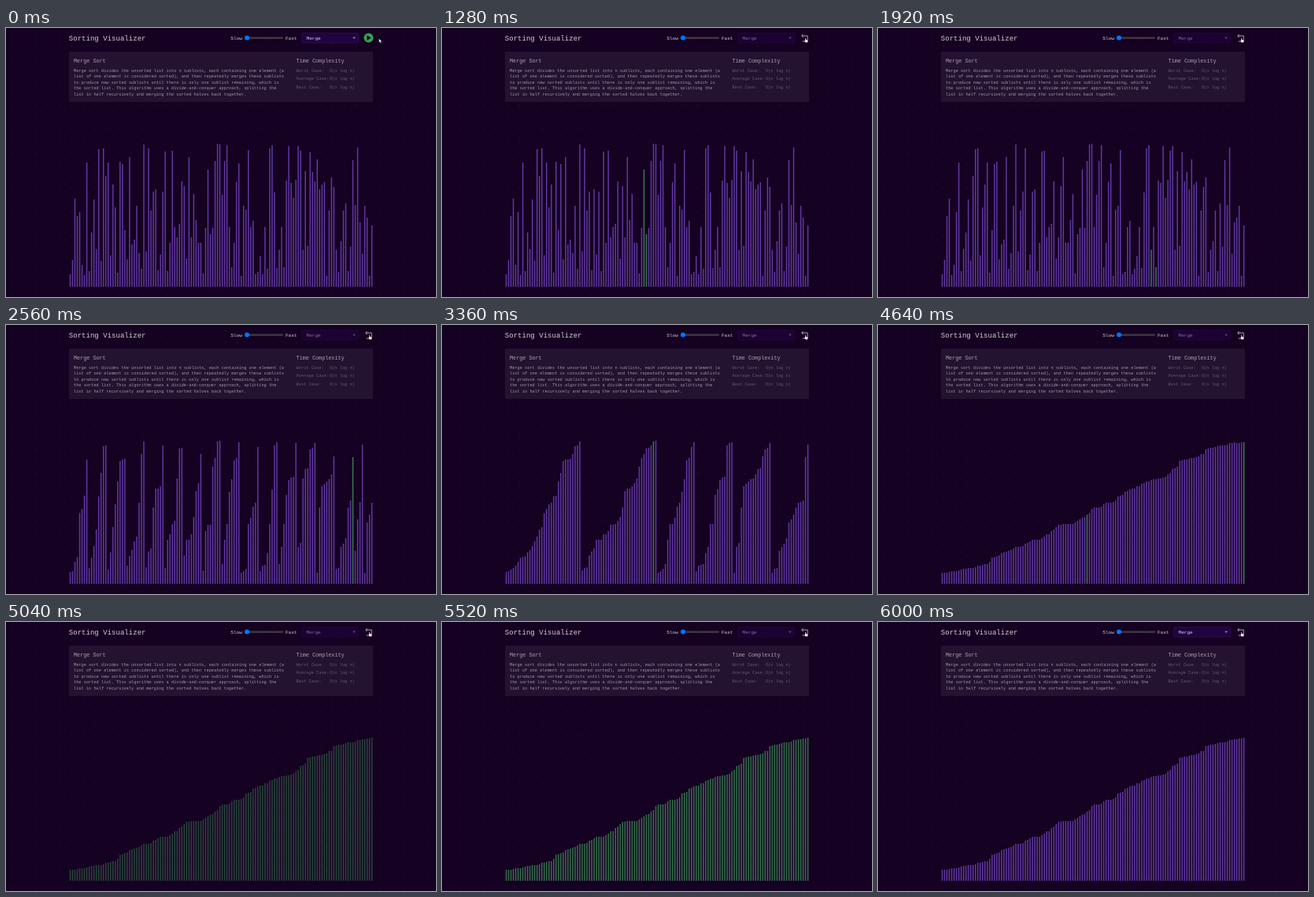
An HTML page that plays this animation: 546 px wide and 342 px high, repeating every 6240 ms.

```html
<!DOCTYPE html>
<html lang="en">
<head>
<meta charset="utf-8">
<title>Sorting Visualizer</title>
<style>
  html, body { margin: 0; width: 100%; height: 100%; overflow: hidden; background: #150121; }
  svg { display: block; width: 100vw; height: 100vh; }
  text { font-family: "Liberation Mono", "DejaVu Sans Mono", monospace; white-space: pre; }
  .title { font-size: 9.05px; fill: #d3cbd8; }
  .label { font-size: 6.03px; fill: #d8d0de; }
  .heading { font-size: 6.79px; fill: #aaa0b1; }
  .body { font-size: 5.3px; fill: #a096a8; }
  .dim { font-size: 5.3px; fill: #665870; }
</style>
</head>
<body>
<svg viewBox="0 0 546 342" xmlns="http://www.w3.org/2000/svg">
  <defs>
    <pattern id="dots" width="15.083" height="15.083" patternUnits="userSpaceOnUse">
      <circle cx="7.54" cy="7.54" r=".42" fill="#fff" fill-opacity=".25"/>
    </pattern>
  </defs>
  <rect width="546" height="342" fill="#150121"/>
  <rect width="546" height="342" fill="url(#dots)"/>

  <text class="title" x="79.8" y="15.6">Sorting Visualizer</text>
  <text class="label" x="285.3" y="14.6">Slow</text>
  <rect x="303" y="11.3" width="49" height="2.6" rx="1.3" fill="#3b343f"/>
  <circle cx="306" cy="12.6" r="3" fill="#0075ff"/>
  <text class="label" x="355" y="14.6">Fast</text>

  <g id="select">
    <rect x="375.6" y="6.4" width="72.2" height="12.6" rx="1.6" fill="#200440" stroke="#371464" stroke-width=".6"/>
    <text class="label" x="381.6" y="14.6">Merge</text>
    <path d="M440.2 11.8h3.6l-1.8 2z" fill="#b5a9c0"/>
  </g>

  <g id="play">
    <circle cx="460.4" cy="12.6" r="6" fill="#34a04d"/>
    <path d="M458.4 9.3v6.6l5-3.3z" fill="#150121"/>
  </g>
  <g id="reset" fill="none" stroke="#bdb2c6" stroke-width=".9">
    <path d="M458.6 8l-2 2 2 2M456.8 10h7.4v7h-6.4"/>
  </g>

  <rect x="80" y="30" width="386" height="64" rx=".8" fill="#241231"/>
  <text class="heading" x="86" y="44.2">Merge Sort</text>
  <g id="about"></g>
  <text class="heading" x="368.6" y="44.2">Time Complexity</text>
  <g id="costs"></g>
  <g id="bars"></g>

  <path id="arrow" d="M0 0v5.2l1.3-1.1.9 1.9.8-.4-.9-1.8h1.6z" fill="#fff" stroke="#000" stroke-width=".3"/>
  <path id="hand" d="M461 13.2q.6-.7 1.1 0v1.6l2 .5q.6.2.5.9l-.4 2.2h-2.6l-1.6-2.2q.3-.7 1 0z" fill="#fff" stroke="#000" stroke-width=".3"/>
</svg>
<script>
const LOOP = 6240, TICK = 80;
const CLICK = 960, SORT_START = 1046, STEP_MS = 4.029, PULSE_MS = 1000;
const BASE = 329, LEFT = 80.75, PITCH = 3.0166;
const PURPLE = "#6038a2", GREEN = "#397a50";

const tops = [
  313, 295, 217, 239, 234, 301, 314, 171, 309, 260, 218, 281, 154, 296, 153, 188,
  171, 289, 199, 228, 311, 170, 173, 257, 294, 164, 275, 269, 226, 286, 306, 148,
  284, 153, 232, 208, 205, 308, 288, 208, 157, 309, 273, 156, 253, 266, 249, 195,
  201, 293, 164, 266, 211, 244, 273, 273, 312, 254, 180, 262, 254, 169, 147, 148,
  212, 169, 149, 253, 304, 273, 196, 172, 315, 226, 231, 155, 253, 245, 313, 310,
  290, 313, 253, 306, 153, 149, 209, 305, 282, 253, 304, 194, 150, 197, 216, 193,
  150, 156, 282, 182, 277, 158, 183, 195, 167, 205, 199, 196, 315, 232, 190, 202,
  282, 310, 271, 232, 223, 309, 278, 168, 225, 152, 247, 287, 226, 241, 315, 251
];
const heights = tops.map(top => BASE - top);

const byId = id => document.getElementById(id);
function add(parent, tag, attrs, text = "") {
  const node = document.createElementNS("http://www.w3.org/2000/svg", tag);
  for (const name in attrs) node.setAttribute(name, attrs[name]);
  node.textContent = text;
  return byId(parent).appendChild(node);
}
const show = (id, on) => byId(id).setAttribute("visibility", on ? "visible" : "hidden");

[
  "Merge sort divides the unsorted list into n sublists, each containing one element (a",
  "list of one element is considered sorted), and then repeatedly merges these sublists",
  "to produce new sorted sublists until there is only one sublist remaining, which is",
  "the sorted list. This algorithm uses a divide-and-conquer approach, splitting the",
  "list in half recursively and merging the sorted halves back together."
].forEach((line, n) => add("about", "text", { class: "body", x: 86, y: 55.7 + n * 7.54 }, line));

["Worst Case:", "Average Case:", "Best Case:"].forEach((label, n) => {
  const y = 55.8 + n * 10.55;
  add("costs", "text", { class: "dim", x: 368.6, y }, label);
  add("costs", "text", { class: "dim", x: 411, y }, "O(n log n)");
});

const bars = heights.map((_, n) => add("bars", "rect", { x: LEFT + n * PITCH, width: 1.51 }));

// Bottom-up merge sort, recorded as one write per step.
function recordSteps(values) {
  const steps = [], count = values.length;
  let data = values.slice();
  for (let width = 1; width < count; width *= 2) {
    const next = [];
    for (let start = 0; start < count; start += 2 * width) {
      const mid = start + width, end = mid + width;
      let i = start, j = mid;
      while (i < mid || j < end) {
        const marked = [];
        if (i < mid) marked.push(i);
        if (j < end) marked.push(j);
        const takeLeft = j >= end || (i < mid && data[i] <= data[j]);
        const value = data[takeLeft ? i++ : j++];
        steps.push({ at: next.length, value, marked });
        next.push(value);
      }
    }
    data = next;
  }
  return steps;
}
const steps = recordSteps(heights);
const SORT_END = SORT_START + steps.length * STEP_MS;
const PULSE_END = SORT_END + PULSE_MS;

function drawBars(time) {
  const done = Math.max(0, Math.min(steps.length, Math.floor((time - SORT_START) / STEP_MS)));
  const current = heights.slice();
  for (let n = 0; n < done; n++) current[steps[n].at] = steps[n].value;
  const marked = time >= SORT_START && done < steps.length ? steps[done].marked : [];
  const pulsing = time >= SORT_END && time < PULSE_END;
  bars.forEach((bar, n) => {
    bar.setAttribute("y", BASE - current[n]);
    bar.setAttribute("height", current[n]);
    bar.setAttribute("fill", pulsing || marked.includes(n) ? GREEN : PURPLE);
  });
  const phase = (time - SORT_END) / PULSE_MS;
  byId("bars").setAttribute("opacity", pulsing ? 0.75 + 0.25 * Math.cos(2 * Math.PI * phase) : 1);
}

function drawControls(time) {
  const sorting = time >= CLICK && time < PULSE_END;
  byId("select").setAttribute("opacity", sorting ? 0.55 : 1);
  show("play", time < CLICK);
  show("reset", time >= CLICK);
  const travel = Math.min(1, time / 560);
  const eased = travel * travel * (3 - 2 * travel);
  byId("arrow").setAttribute("transform", `translate(${473.6 - 12 * eased} ${13.4 - 0.2 * eased})`);
  show("arrow", travel < 0.8);
  show("hand", travel >= 0.8);
}

function frame() {
  const time = Math.floor((performance.now() % LOOP) / TICK) * TICK;
  drawBars(time);
  drawControls(time);
  requestAnimationFrame(frame);
}
frame();
</script>
</body>
</html>
```
